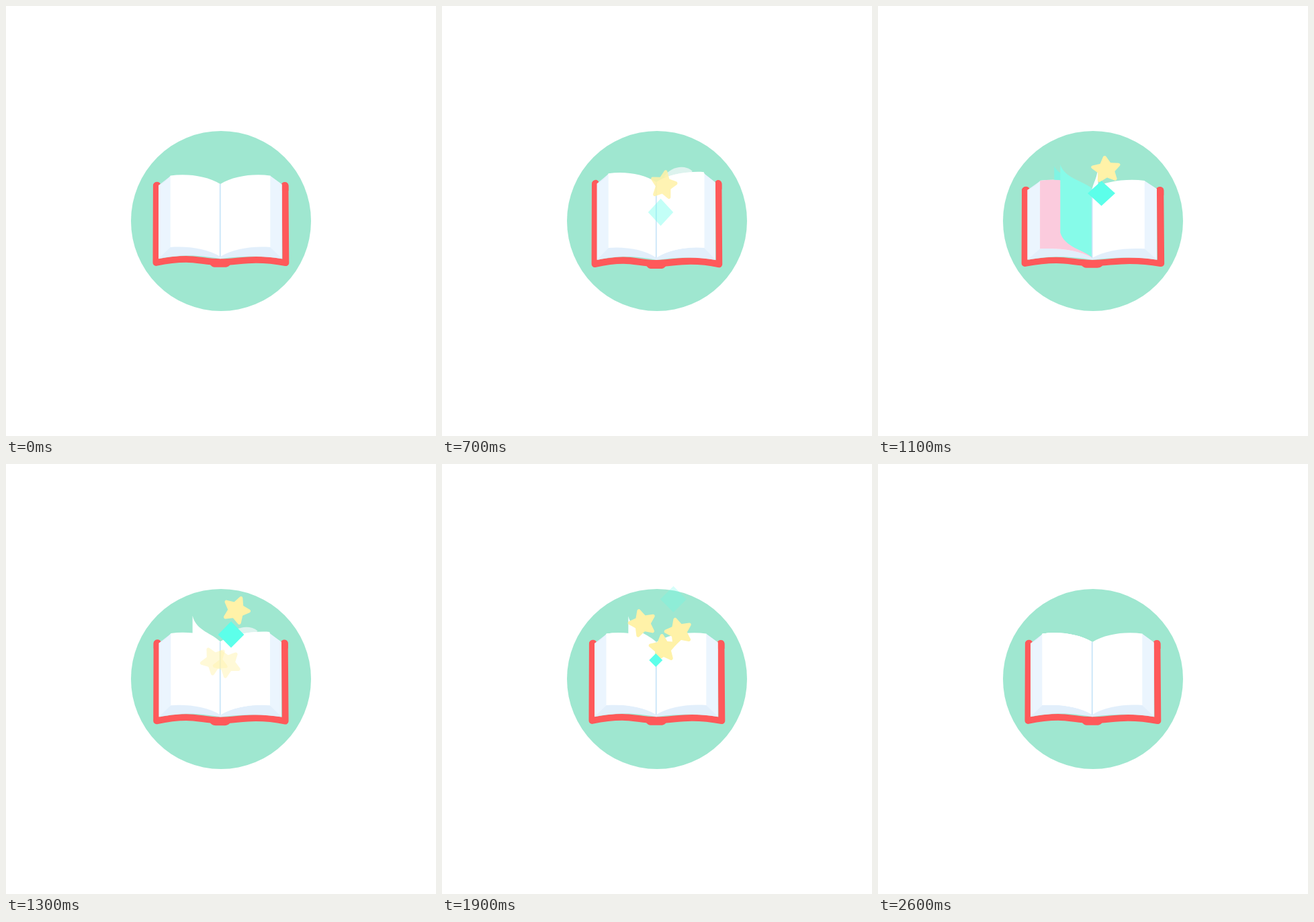
These frames come from a looping animation (640x640 px, 2.7 s). An HTML page with a canvas:

```html
<!DOCTYPE html>
<html lang="en">
<head>
<meta charset="utf-8">
<title>Open book</title>
<style>
  html, body { margin: 0; width: 100%; height: 100%; overflow: hidden; background: #fff; }
  canvas { display: block; width: 640px; height: 640px; }
</style>
</head>
<body>
<canvas id="stage" width="640" height="640"></canvas>
<script>
const ctx = document.getElementById('stage').getContext('2d');
const LOOP = 2700, STEP = 100, END = 2600, FLIPS = [600, 1200];
const RED = '#ff595a', YELLOW = '#fff2a8', CYAN = '#5cffea', PINK = '#ff80b0';
const FADE_IN = 230, FADE_OUT = 300, SPIN = .14;

// Extreme poses of the bouncing book: time, stretch
const poses = [[200, 0], [450, .092], [1060, -.052], [1300, .007], [1540, -.022], [1850, 0]];

// Born at (x, y), drifting with (vx, vy) pixels per second
const particles = [
  { shape: star, size: 25, color: YELLOW, born: 500, life: 1240, x: 326, y: 286, vx: 21, vy: -84.5, angle: 54 },
  { shape: diamond, size: 19.5, color: CYAN, born: 615, life: 1360, x: 324.4, y: 315.5, vx: 15.6, vy: -89, angle: 0 },
  { shape: star, size: 25, color: YELLOW, born: 1195, life: 1240, x: 312, y: 303, vx: -19.4, vy: -93.5, angle: 29 },
  { shape: star, size: 25, color: YELLOW, born: 1195, life: 1240, x: 325, y: 305.5, vx: 38.8, vy: -79, angle: 29 },
  { shape: star, size: 25, color: YELLOW, born: 1595, life: 1240, x: 323, y: 301.5, vx: 19, vy: -88, angle: 25 },
  { shape: diamond, size: 10, color: CYAN, born: 1560, life: 750, x: 321, y: 313.5, vx: -8, vy: -63.5, angle: 0 },
  { shape: diamond, size: 10, color: PINK, born: 1950, life: 1000, x: 327.7, y: 324, vx: 13.3, vy: -80, angle: 0 }
];

const clamp = v => Math.max(0, Math.min(1, v));
const ramp = (t, from, to) => clamp((t - from) / (to - from));
const ease = k => (1 - Math.cos(Math.PI * k)) / 2;

function stretchAt(t) {
  let v = 0;
  for (let i = 1; i < poses.length; i++) {
    const [t0, v0] = poses[i - 1], [t1, v1] = poses[i];
    v += (v1 - v0) * ease(ramp(t, t0, t1));
  }
  return v;
}

function fill(d, color) {
  ctx.fillStyle = color;
  ctx.fill(new Path2D(d));
}

function star(size) {
  const points = [];
  for (let i = 0; i < 10; i++) {
    const r = i % 2 ? size / 2 : size, a = i * Math.PI / 5;
    points.push([r * Math.sin(a), -r * Math.cos(a)]);
  }
  const [first, last] = [points[0], points[9]];
  ctx.beginPath();
  ctx.moveTo((first[0] + last[0]) / 2, (first[1] + last[1]) / 2);
  points.forEach((p, i) => ctx.arcTo(...p, ...points[(i + 1) % 10], i % 2 ? 1 : 2.6));
  ctx.fill();
}

function diamond(size) {
  ctx.rotate(Math.PI / 4);
  const side = size * Math.SQRT2;
  ctx.fillRect(-side / 2, -side / 2, side, side);
}

function drawParticle(p, t) {
  const age = t - p.born;
  const alpha = Math.min(clamp(age / FADE_IN), clamp((p.life - age) / FADE_OUT));
  if (!alpha) return;
  ctx.save();
  ctx.translate(p.x + p.vx * age / 1000, p.y + p.vy * age / 1000);
  if (p.shape === star) ctx.rotate((p.angle + SPIN * age) * Math.PI / 180);
  ctx.globalAlpha = alpha;
  ctx.fillStyle = p.color;
  p.shape(p.size);
  ctx.restore();
}

// turn: 0 lies on the right, 1 lies on the left
function leaf(turn, color) {
  const w = 74.3 * Math.cos(Math.PI * turn), s = Math.sin(Math.PI * turn);
  const lift = s * (17 + 21 * turn), bend = .66 + .26 * s;
  const X = k => 319 + k * w;
  fill(`M319 265 C${X(.26)} 253 ${X(bend)} 249 ${X(1)} ${252.5 - lift}
    L${X(1)} ${359 - lift} C${X(bend)} 357 ${X(.26)} 361 319 373Z`, color);
}

function drawCover() {
  ctx.strokeStyle = RED;
  ctx.lineWidth = 9.8;
  ctx.lineCap = ctx.lineJoin = 'round';
  ctx.stroke(new Path2D(`M223.8 267.3 L223.4 382 C240 378.5 252 376.8 268 376.8
    C286 376.8 298 381 319 381.2 C338 381 352 377.8 372 377.8 C388 377.8 402 379.4 416.4 382.2 L415.5 267.3`));
  fill('M219 268 A5.6 5.6 0 0 1 230.5 267 L230 275 L219 275Z', RED);
  fill('M409.3 267 A5.6 5.6 0 0 1 420.5 268 L420.5 275 L409.3 275Z', RED);
  fill('M302 382 H336 C333 386 331 388.8 326 388.8 H312 C307 388.8 305 387 302 382Z', RED);
}

function drawPages() {
  fill(`M227 267 L245 253 L319 266 L393 253 L410.6 265.5 V376.3
    C385 372 358 371.5 319 376.2 C285 370.5 262 369.5 227 376.3Z`, '#e2effb');
  fill('M227 267 C234 264 240 259 245 252.5 V359 L227 376Z', '#ebf5fe');
  fill('M410.6 265.5 L393 252.5 V359 L410.6 376Z', '#ebf5fe');
  leaf(1, '#fff');
  leaf(0, '#fff');
}

// Three leaves turn at different speeds; the coloured two vanish under the white one.
function drawFlip(s) {
  const pink = ramp(s, 85, 500), teal = ramp(s, 180, 631), white = ramp(s, 87, 976);
  const paint = (turn, back) => turn > 0 && leaf(turn, turn > .5 ? back : '#fff');

  if (s < 650) {
    if (pink > 0 && pink < .1) fill('M331 257 C341 243 362 239 375 249 L360 262Z', '#ddf3ee');
    if (teal > .5) leaf(Math.min(1, teal + .05), '#80f4e3');
    paint(pink, '#fbcbdd');
    paint(teal, '#86fbe9');
  }
  paint(white, '#fff');
}

function draw(t) {
  ctx.fillStyle = '#fff';
  ctx.fillRect(0, 0, 640, 640);
  ctx.fillStyle = '#9fe7d0';
  ctx.beginPath();
  ctx.arc(320, 320, 134, 0, 2 * Math.PI);
  ctx.fill();

  const stretch = stretchAt(t);
  ctx.save();
  ctx.translate(320, 333 + 75 * Math.max(0, -stretch));
  ctx.scale(1 - stretch, 1 + stretch);
  ctx.translate(-320, -333);
  drawCover();
  drawPages();
  FLIPS.forEach(start => drawFlip(t - start));
  ctx.fillStyle = '#c4e3f8';
  ctx.fillRect(317.9, 265, 1.6, 108);
  if (t < END) particles.forEach(p => drawParticle(p, t));
  ctx.restore();
}

const start = performance.now();
function tick() {
  const t = (performance.now() - start) % LOOP;
  draw(Math.floor(t / STEP) * STEP);
  requestAnimationFrame(tick);
}
tick();
</script>
</body>
</html>
```
